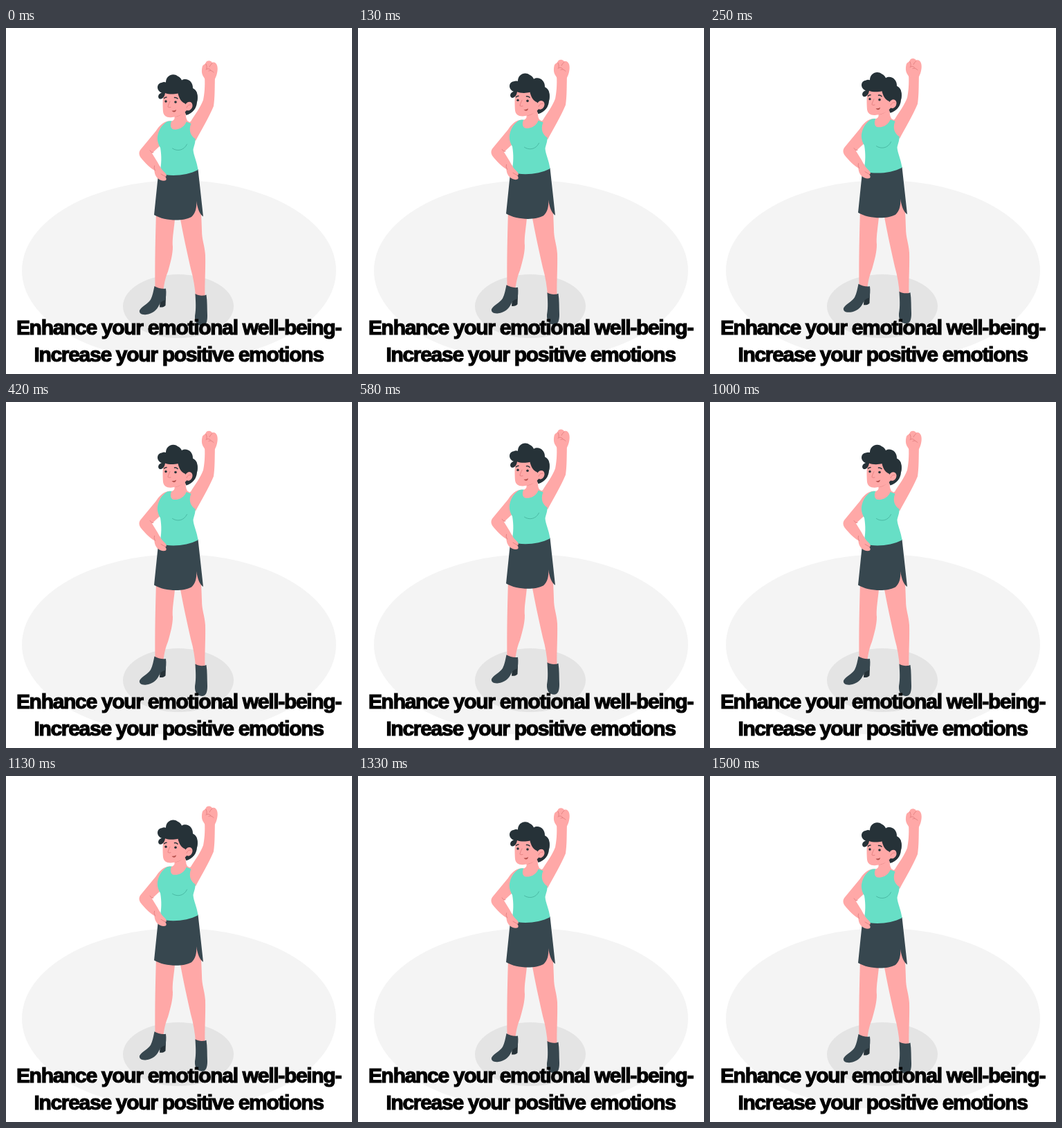
Animation of 500x500 px, one loop 1.54 s. Source, as an HTML page:

```html
<!DOCTYPE html>
<html lang="en">
<head>
<meta charset="utf-8">
<title>Enhance your emotional well-being</title>
<style>
  html, body { margin: 0; width: 100%; height: 100%; overflow: hidden; background: #fff; }
  svg { display: block; width: 100%; height: 100%; }
  .skin { fill: #ffa8a7; }
  .cloth { fill: #37474f; }
  .dark { fill: #263238; }
  .top { fill: #67dfc6; }
  .line { fill: none; stroke: #e27f80; stroke-width: .9; stroke-linecap: round; stroke-linejoin: round; }
  .brow { stroke: #263238; stroke-width: 1.5; }
  .fold { stroke: #48b5a0; }
  text {
    font: bold 30px "Liberation Sans", Arial, sans-serif;
    letter-spacing: -1.3px;
    text-anchor: middle;
    stroke: #000;
    stroke-width: 1.2;
  }
</style>
</head>
<body>
<svg viewBox="0 0 500 500">
  <ellipse cx="250" cy="350.5" rx="227" ry="130.5" fill="#f4f4f4"/>
  <ellipse cx="249" cy="402" rx="80" ry="46" fill="#e4e4e4"/>

  <g id="woman">
    <!-- legs -->
    <path class="skin" d="M217 265 C216 300 215 335 215.500 379 Q222 382 227.500 378 C229 367 231 359 234 352 C238 338 241 327 241 316 C240 302 243 292 245 265Z"/>
    <path class="skin" d="M250 265 C256 300 262 325 267 348 C271 362 273 375 274 388 Q281 391 287.500 387 C287 369 288.500 350 288 328 C287 313 283 307 283 292 L281 240 L270 240Z"/>

    <!-- boots -->
    <path class="dark" d="M223 388 L231 389 L230.500 401 Q228 404 222 403.500Z"/>
    <path class="cloth" d="M214.500 373 C219 376 226 377.500 231 376.500 C232 383 231 389 230.500 393 C226 394 223 396 221.500 400 C218 408 211 413 203 414 C196 415 192 412 193 408 C196 402 205 399 209 392.500 C212 387 213 380 214.500 373Z"/>
    <path class="cloth" d="M273.500 384 C278 387 285 387.500 289.500 385.500 C291 395 290.500 406 291 416 C291 425 289 430.500 283 430.500 C276 430 272.500 425 273 416 C275 405 274 395 273.500 384Z"/>

    <!-- skirt -->
    <path class="cloth" d="M220.500 207 L277.500 204 L285 272.500 C280 269 277 262 275 250 C276 260 273.500 268 268 273 C255 280 229 279 214 270Z"/>

    <!-- raised arm -->
    <path class="skin" d="M287 70 C288 84 286.500 97 285 104 C281 115 273 125 267 135 L259 140 L262 158 L274 163 C283 146 293 130 300 113 C302 100 301.500 86 302 70Z"/>
    <path class="skin" d="M284.500 69 C282 64 283 58 284 55 C285.500 52.500 288 52.500 289 49.500 C291 46.500 296 46.500 298 50 C301 48.500 304 51 305 54 C307 60 304.500 69 302 73.500 C297 76 289 75.500 287 73Z"/>
    <path class="line" d="M289 52 Q291 56 290 59 M298 51 Q295 53 294 56 M289 60 Q293 57 296 61 M293 62 Q296 60 300 64"/>

    <!-- neck and chest -->
    <path class="skin" d="M243.500 121 L261 116 Q258 127 262 134 L268 138 L266 156 L232 156 L232 137 Q242 135 243.500 131Z"/>
    <path class="line" d="M245 128 Q252 127 256 122"/>

    <!-- arm on the hip -->
    <path class="skin" d="M237 134 C227 135 221 142 216.500 149 L195 175 C191.500 179 192 183 194.500 187 C201 195 208 202 214 205.500 L225 205 L219 194 L211 181 L226 167Z"/>

    <!-- tank top -->
    <path class="top" d="M233 135 L239.500 134 C236.500 140 238 145.500 242 146.500 C250 147.500 258 143 260.500 135.500 L267.500 138 C263 149 268 157 273.500 160 C274 166 271 172 270.500 176 C271 184 276 193 277.500 205 C262 213 238 215.500 222 210 C225 196 225 185 223 173 C219 166 218 160 219.500 154 C222 144 227 139 233 135Z"/>
    <path class="line fold" d="M240.500 174 C247 178.500 257 177.500 261.500 168"/>

    <!-- hand -->
    <path class="skin" d="M214 203 L222.500 200 C225 206 231 209 231.500 212 C232.500 214 231 215 230 214.500 C232 217 232 219 231 220 C228 222 222 220 219 217 C215 213 214.500 208 214 203Z"/>
    <path class="line" d="M214.500 199 Q213 202 215.500 206 M208 177 Q210 181 213 180 M224 211 L230 214.500"/>

    <!-- head -->
    <path class="dark" d="M246 90 L275 92 C277.500 99 276.500 104 276 107 C275.500 116 270 123 260.500 126Z"/>
    <path class="skin" d="M228 92 C226 104 226.500 113 227 121 C228 127.500 233 130 240 129 C249 128 257 124 261 119 L259 92Z"/>
    <path class="dark" d="M222 102.500 C218.500 100 220 95 225 93.500 C217 91 217 80 225 79 Q228 77.500 231 78.500 C231 68 242 64.500 248 69.500 C251.500 71 253 73 254 75.500 C261 71 270.500 77 270 87 C277 90 278 99 276 107 L262 113 L258.500 109 C253 107 250 101 248.500 94.500 C241 96.500 234 95.500 230 94 C229 100 226 103 222 102.500Z"/>
    <ellipse class="skin" cx="264" cy="113" rx="5.300" ry="6.500" transform="rotate(25 264 113)"/>
    <path class="line" d="M261 115 Q263 110 267 111"/>

    <!-- face -->
    <circle class="dark" cx="231" cy="106" r="1.700"/>
    <circle class="dark" cx="245" cy="107" r="1.800"/>
    <path class="line brow" d="M228.500 101.500 Q230 100 232 100 M243.500 100.500 Q246 100 248 102"/>
    <path class="line" d="M237 106 Q234 112 234 114 Q235.500 115.500 238 114.500"/>
    <path d="M239.500 119.500 Q243 120 246 118 Q245.500 121.500 242.500 121.500 Q240.500 121 239.500 119.500Z" fill="#b5504c"/>
  </g>

  <text x="249.500" y="443">Enhance your emotional well-being-</text>
  <text x="249.500" y="481.500">Increase your positive emotions</text>
</svg>
<script>
  const LOOP = 1540, FPS = 24, PERIOD = 1500, LIFT = 10, LEAD = 45;
  const woman = document.getElementById('woman');

  // Share of the full lift: up and down at constant speed.
  const rise = ms => 1 - Math.abs(1 - 2 * (((ms + LEAD) / PERIOD) % 1));

  function draw() {
    // Hold each pose for one 24 fps step, rounded to 10 ms.
    const step = Math.floor((performance.now() % LOOP + 5) * FPS / 1000);
    const y = LIFT * (rise(0) - rise(step * 1000 / FPS));
    woman.setAttribute('transform', `translate(0 ${y.toFixed(2)})`);
    requestAnimationFrame(draw);
  }
  draw();
</script>
</body>
</html>
```
